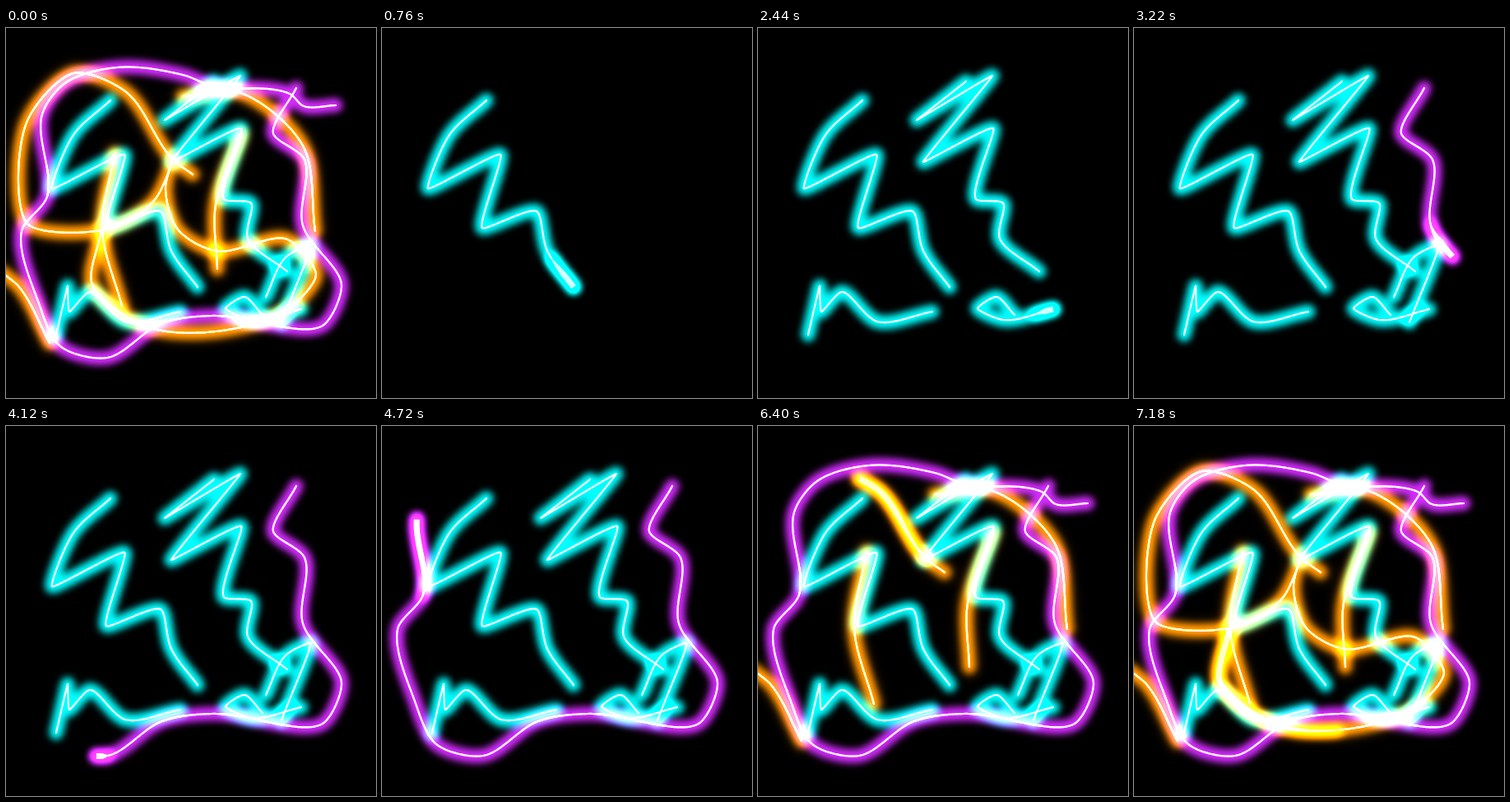
Animation, 450 px wide and 450 px high, one loop 7240 ms. Source, as an HTML page with a canvas:

```html
<!DOCTYPE html>
<html lang="en">
<head>
<meta charset="utf-8">
<title>Neon scribble</title>
<style>
html, body { margin: 0; width: 100%; height: 100%; overflow: hidden; background: #000; }
canvas { display: block; width: 100vmin; height: 100vmin; }
</style>
</head>
<body>
<canvas id="stage" width="450" height="450"></canvas>
<script>
const ctx = document.getElementById('stage').getContext('2d');
const LOOP = 7240, FIRST = 100, STEP = 60;
const CORE = 2.2, HEAD = 7, GLOW = 17, BLUR = 9, AWAY = 2000;
const CYAN = '#00ffff', PURPLE = '#d42cff', ORANGE = '#ff9400';

const unit = ([x0, y0], [x1, y1]) => {
  const d = Math.hypot(x1 - x0, y1 - y0) || 1;
  return [(x1 - x0) / d, (y1 - y0) / d];
};

// Tangent at a key point: the mean direction, shrinking as the turn gets sharper
function tangent(keys, i) {
  const a = keys[i - 1], b = keys[i], c = keys[i + 1];
  const before = a ? unit(a, b) : unit(b, c), after = c ? unit(b, c) : before;
  const mean = [(before[0] + after[0]) / 2, (before[1] + after[1]) / 2];
  return mean.map(v => v * Math.hypot(...mean));
}

// Smooth curve through the key points, each sample as [x, y, distance so far, key index]
function curve(keys) {
  const samples = [[...keys[0], 0, 0]];
  for (let i = 1; i < keys.length; i++) {
    const p = keys[i - 1], q = keys[i], m = tangent(keys, i - 1), n = tangent(keys, i);
    const size = Math.hypot(q[0] - p[0], q[1] - p[1]), count = Math.ceil(size / 2);
    for (let j = 1; j <= count; j++) {
      const f = j / count, g = 1 - f;
      const [x, y] = [0, 1].map(k => g * g * (1 + 2 * f) * p[k] + f * f * (1 + 2 * g) * q[k] +
        size * f * g * (g * m[k] - f * n[k]));
      const [lx, ly, dist] = samples[samples.length - 1];
      samples.push([x, y, dist + Math.hypot(x - lx, y - ly), i - 1 + f]);
    }
  }
  return samples;
}

// A stroke is drawn in legs: [steps, easing power, key points]; strokes follow one another
let clock = 0;
function stroke(color, ...parts) {
  const keys = [], ends = [];
  for (const [, , path] of parts) {
    keys.push(...path.split(' ').map(p => p.split(',').map(Number)));
    ends.push(keys.length - 1);
  }
  const samples = curve(keys);
  let from = 0;
  const legs = parts.map(([steps, power], i) => {
    const to = samples.find(s => s[3] >= ends[i])[2];
    const leg = { start: clock, steps, power, from, to };
    clock += steps;
    from = to;
    return leg;
  });
  return { color, samples, legs };
}

const strokes = [
  stroke(CYAN, [12, 1, '127,88 82,130 56,195 144,154 122,243 188,223 201,271 233,315']),
  stroke(CYAN, [13, 1, '253,65 193,112 285,58 201,163 286,122 265,208 298,213 294,256 342,296']),
  stroke(CYAN, [1, 1, '61,373 75,314'], [6, 1, '77,345 102,321 145,357 212,345']),
  stroke(CYAN, [8, 1, '312,349 290,327 267,341 299,355 359,342']),
  stroke(CYAN, [5, 1, '316,327 340,279 370,264 335,358']),
  stroke(PURPLE,
    [7, 1.7, '353,73 325,128 363,160 361,240'],
    [15, 0.8, '408,312 385,362 250,350 190,359 123,401'],
    [10, 1.3, '66,387 40,335 19,247 50,205'],
    [16, 0.6, '44,105 72,67 135,48 215,57 250,70 345,80 362,95 401,94']),
  stroke(ORANGE, [2, 1, '-4,298 16,315 53,383']),
  stroke(ORANGE, [3, 1, '132,153 117,245 141,338']),
  stroke(ORANGE, [3, 1, '286,130 255,215 257,293']),
  stroke(ORANGE, [3, 1, '215,83 285,79 361,143 376,247']),
  stroke(ORANGE,
    [1, 1, '227,178 203,160'],
    [7, 0.8, '145,77 82,55 25,115 26,238 120,245 180,210 203,160'],
    [7, 2.7, '194,195 209,245 255,271 342,257 377,300 335,347 180,366 105,312 116,246'])
];

// Distance the pen has covered on a stroke after so many steps
function covered({ legs }, step) {
  const leg = legs.filter(l => step > l.start).pop();
  if (!leg) return 0;
  const f = Math.min(1, (step - leg.start) / leg.steps);
  return leg.from + (leg.to - leg.from) * f ** leg.power;
}

const between = (samples, from, to) => samples.filter(s => s[2] >= from - 1 && s[2] <= to + 1e-6);

function line(pts, width, style) {
  ctx.beginPath();
  pts.forEach(([x, y]) => ctx.lineTo(x, y));
  ctx.lineWidth = width;
  ctx.strokeStyle = style;
  ctx.stroke();
}

// Only the blurred shadow lands on the stage
function glow(pts, color, width = GLOW, blur = BLUR, alpha = 1) {
  ctx.save();
  ctx.globalAlpha = alpha;
  ctx.shadowColor = color;
  ctx.shadowBlur = blur;
  ctx.shadowOffsetX = AWAY;
  line(pts.map(([x, y]) => [x - AWAY, y]), width, color);
  ctx.restore();
}

// The newest piece widens towards the pen
function taper(pts) {
  const left = [], right = [], n = pts.length - 1;
  pts.forEach(([x, y], i) => {
    const [dx, dy] = unit(pts[Math.max(0, i - 1)], pts[Math.min(n, i + 1)]);
    const r = (CORE + (HEAD - CORE) * Math.min(1, 2 * i / n)) / 2;
    left.push([x - dy * r, y + dx * r]);
    right.unshift([x + dy * r, y - dx * r]);
  });
  ctx.beginPath();
  left.concat(right).forEach(([x, y]) => ctx.lineTo(x, y));
  ctx.fillStyle = 'rgba(255,255,255,.82)';
  ctx.fill();
}

function draw(ms) {
  const t = ms % LOOP;
  const step = t < FIRST ? clock + 1 : Math.floor((t - FIRST) / STEP) + 1;
  ctx.globalCompositeOperation = 'source-over';
  ctx.fillStyle = '#000';
  ctx.fillRect(0, 0, 450, 450);
  ctx.globalCompositeOperation = 'lighter';
  ctx.lineCap = ctx.lineJoin = 'round';
  for (const s of strokes) {
    const now = covered(s, step), before = covered(s, step - 1);
    if (!now) continue;
    const pts = between(s.samples, 0, now);
    if (s.color === ORANGE) glow(pts, ORANGE, 34, 12, 0.07);
    glow(pts, s.color);
    if (before) line(between(s.samples, 0, before), CORE, '#fff');
    if (now > before) {
      const head = between(s.samples, before, now);
      glow(head, s.color);
      taper(head);
    }
  }
}

const start = performance.now();
function tick() {
  draw(performance.now() - start);
  requestAnimationFrame(tick);
}
tick();
</script>
</body>
</html>
```
